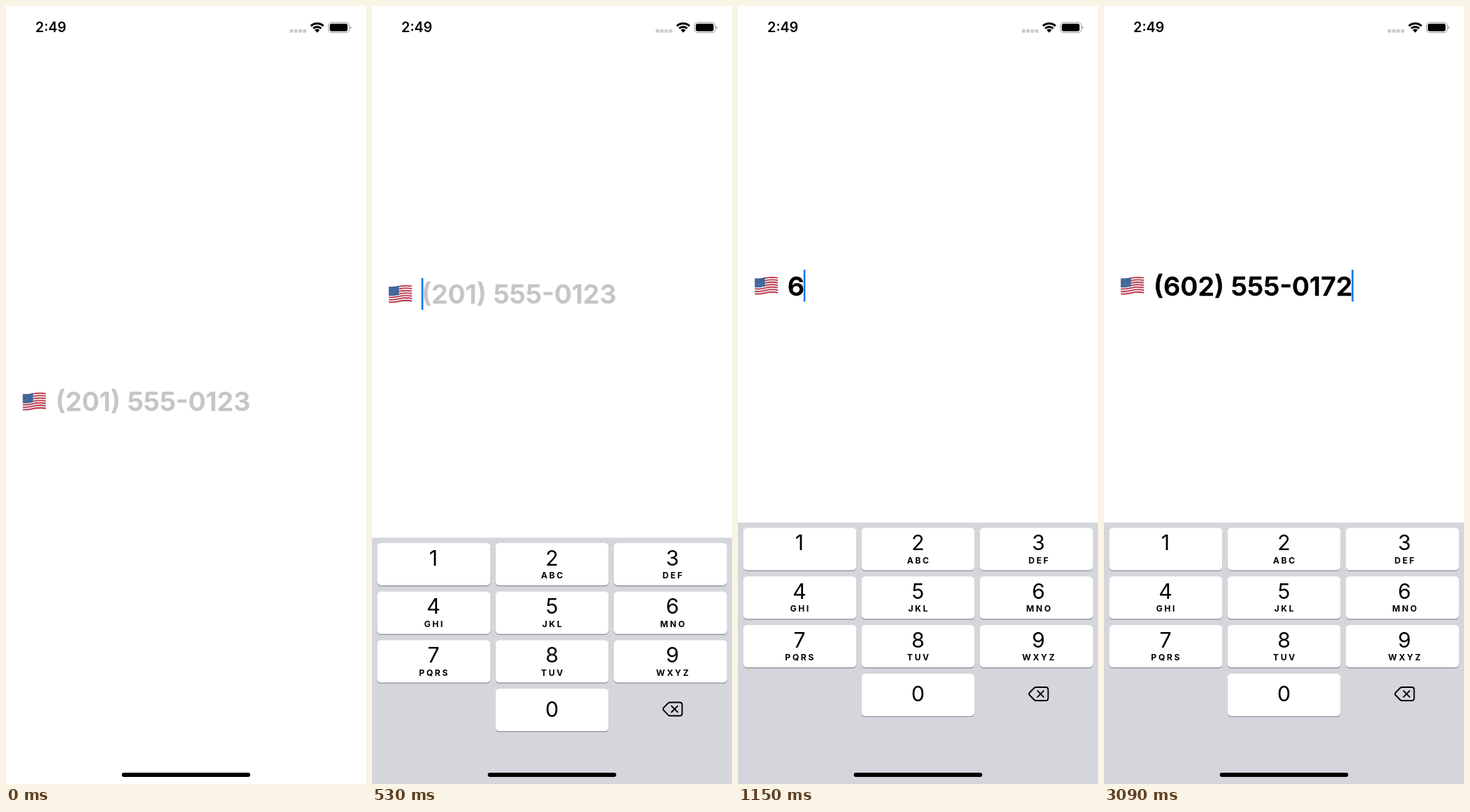
Animation of 509x1101 px, one loop 3270 ms. Source, as an HTML page:

```html
<!DOCTYPE html>
<html lang="en">
<head>
<meta charset="utf-8">
<title>Phone number field</title>
<style>
  html, body { margin: 0; width: 100%; height: 100%; overflow: hidden; background: #fff; }
  svg { display: block; width: 100%; height: 100%; font-family: Inter, "Liberation Sans", sans-serif; }
  #number { font-size: 37.5px; font-weight: 600; stroke-width: .5; stroke-linejoin: round; }
  .digit { font-size: 30px; text-anchor: middle; }
  .letters { font-size: 12px; font-weight: 700; letter-spacing: 2.6px; text-anchor: middle; }
</style>
</head>
<body>
<svg viewBox="0 0 509 1101">
  <defs>
    <clipPath id="fan"><path d="M440 37.8 426 22.8H454Z"/></clipPath>
    <clipPath id="canton"><rect x="23" y="-20" width="15" height="40"/></clipPath>
  </defs>

  <!-- status bar -->
  <text x="41.5" y="37.4" font-size="19.5" font-weight="600">2:49</text>
  <g id="signal" fill="#cbcbcd"></g>
  <g clip-path="url(#fan)" fill="none" stroke="#000" stroke-width="3">
    <circle cx="440" cy="37.4" r="12.7"/>
    <circle cx="440" cy="37.4" r="8"/>
    <circle cx="440" cy="37.4" r="4.9" fill="#000" stroke="none"/>
  </g>
  <rect x="455.9" y="23.2" width="29.4" height="14.4" rx="4.3" fill="none" stroke="#999"/>
  <rect x="457.8" y="25.1" width="25.1" height="10.6" rx="2.6"/>
  <path d="M486.6 28.2q1.6.6 1.6 2.2t-1.6 2.2z" fill="#999"/>

  <!-- field, vertically centred on 0 -->
  <g id="field">
    <g id="flag" fill="none"></g>
    <text id="number" x="70" y="13.8"></text>
    <rect id="caret" y="-22.8" width="2.6" height="45.4" rx="1.2" fill="#0a7aea"/>
  </g>

  <g id="keyboard">
    <rect width="509" height="372" fill="#d5d6dc"/>
    <g id="keys"></g>
    <path d="M418.8 234q1.2-1 3.2-1h13q3.5 0 3.5 3.5v12q0 3.5-3.5 3.5h-13q-2 0-3.2-1l-6.8-7q-1-1.5 0-3ZM423.5 238.2l8.6 8.6m0-8.6l-8.6 8.6"
      fill="none" stroke="#000" stroke-width="1.9" stroke-linecap="round" stroke-linejoin="round"/>
  </g>
  <rect x="163.7" y="1085" width="181.6" height="6" rx="3"/>
</svg>

<script>
const LOOP = 3270;
const TICK = 200 / 3;          // the slide is shown at 15 pictures a second
const PLACEHOLDER = "(201) 555-0123";
const DIGITS = "6025550172";
const KEY_TIMES = [1110, 1300, 1440, 1660, 2130, 2290, 2460, 2760, 2910, 3090];
const LETTERS = ["", "ABC", "DEF", "GHI", "JKL", "MNO", "PQRS", "TUV", "WXYZ"];
const LABEL_X = [86.9, 254.5, 424.8];

const el = id => document.getElementById(id);
const repeat = (n, part) => Array.from({ length: n }, (_, i) => part(i)).join("");

el("signal").innerHTML = repeat(4, i =>
  `<rect x="${401.2 + i * 6.2}" y="33" width="4.8" height="4.8" rx="1.2"/>`);

// Waving flag: every stripe is the same curve, one step lower
const wave = (i, attrs) =>
  `<path d="M23.8 ${-9.4 + i * 1.74}c11 2 18-5 32.6-1.5" ${attrs}/>`;
el("flag").innerHTML =
  repeat(13, i => wave(i, `stroke-width="1.8" stroke="${i % 2 ? "#e9e4e6" : "#bd2c43"}"`)) +
  `<g clip-path="url(#canton)">` +
  repeat(7, i => wave(i, `stroke-width="2" stroke="#2f5b94"`)) +
  repeat(6, i => wave(i + .5, `stroke-width=".6" stroke="#b9cbe2" stroke-dasharray=".7 1.6" stroke-dashoffset="${i % 2 * 1.1 - .6}"`)) +
  `</g>`;

function key(digit, column, row) {
  const x = 7.3 + column * 167.3, y = 7.5 + row * 68.8, mid = LABEL_X[column];
  const letters = LETTERS[digit - 1];
  return `<rect x="${x}" y="${y + 1.2}" width="160" height="60" rx="5.5" fill="#898a8e"/>
    <rect x="${x}" y="${y}" width="160" height="60" rx="5.5" fill="#fff"/>
    <text class="digit" x="${mid}" y="${y + (digit ? 31.7 : 39.3)}">${digit}</text>
    <text class="letters" x="${mid + 1.3}" y="${y + 50}">${letters || ""}</text>`;
}
el("keys").innerHTML =
  repeat(9, i => key(i + 1, i % 3, Math.floor(i / 3))) + key(0, 1, 3);

function format(d) {
  if (d.length <= 3) return d;
  if (d.length <= 7) return d.slice(0, 3) + "-" + d.slice(3);
  return `(${d.slice(0, 3)}) ${d.slice(3, 6)}-${d.slice(6)}`;
}

// Critically damped spring: the share of the way still to go
function remaining(ms) {
  const a = Math.max(0, ms) * Math.sqrt(1000 / 3) / 1000;
  return (1 + a) * Math.exp(-a);
}

function draw(now) {
  const t = now % LOOP;
  const shown = Math.floor((t + 5) / TICK) * TICK;
  const focused = t >= 330;
  const typed = format(DIGITS.slice(0, KEY_TIMES.filter(k => t >= k).length));

  const keyboardY = 731 + 372 * remaining(shown - 283);
  const fieldY = 395.8 + 163.8 * remaining(shown - 298);
  el("keyboard").setAttribute("transform", `translate(0 ${keyboardY})`);
  el("field").setAttribute("transform", `translate(0 ${fieldY})`);

  const number = el("number"), color = typed ? "#000" : "#c5c5c7";
  number.textContent = typed || PLACEHOLDER;
  number.setAttribute("fill", color);
  number.setAttribute("stroke", color);

  const caret = el("caret");
  caret.setAttribute("x", 69.9 + (typed ? number.getComputedTextLength() - 1.2 : 0));
  caret.setAttribute("visibility", focused ? "visible" : "hidden");
  requestAnimationFrame(draw);
}
draw(0);
</script>
</body>
</html>
```
